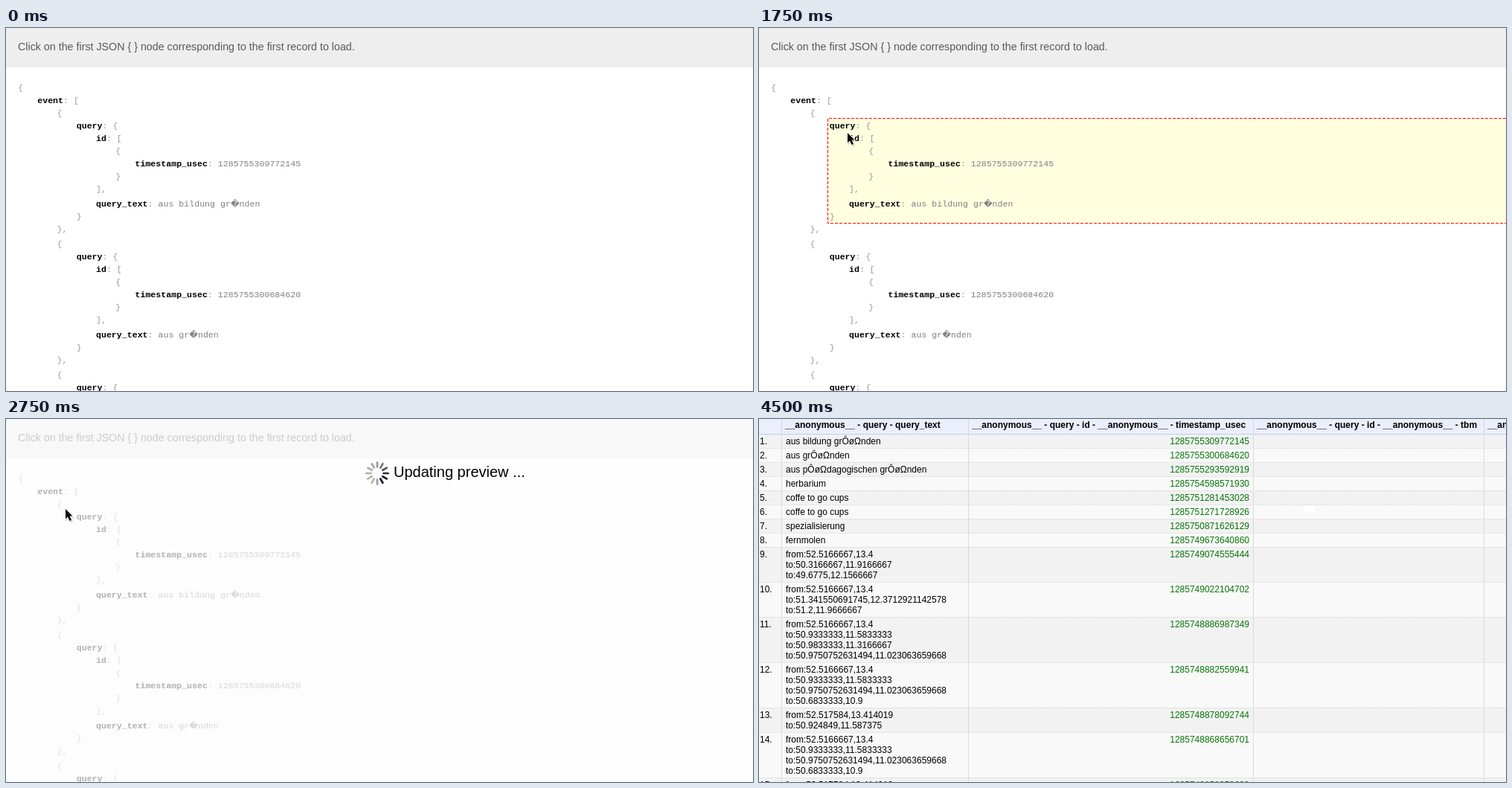
Write an HTML page that moves like this. It is 1004 px wide and 488 px high and loops after 5.25 s.

```html
<!DOCTYPE html>
<html lang="en">
<head>
<meta charset="utf-8">
<title>Choosing a JSON record</title>
<style>
  html, body { margin: 0; width: 100%; height: 100%; overflow: hidden; background: #fff; }
  svg { display: block; width: 1004px; height: 488px; }
  text { font-family: "Liberation Sans", Arial, sans-serif; font-size: 12px; }
  .code { font-family: "Liberation Mono", "Courier New", monospace; font-size: 11.6px; fill: #999; }
  .key { font-weight: bold; fill: #000; }
  .value { fill: #808080; }
  .odd-char { font-family: "DejaVu Sans", sans-serif; font-size: 11.4px; }
  .hint { font-size: 14.27px; fill: #5a5a5a; }
  .busy { font-size: 20px; }
  .head { font-weight: bold; }
  .number { fill: #087508; text-anchor: end; }
</style>
</head>
<body>
<svg id="stage" viewBox="0 0 1004 488"></svg>
<script>
const stage = document.getElementById('stage');
const LOOP = 5250;

function add(parent, tag, attrs = {}, content) {
  const node = document.createElementNS('http://www.w3.org/2000/svg', tag);
  for (const name in attrs) node.setAttribute(name, attrs[name]);
  if (content !== undefined) node.textContent = content;
  parent.append(node);
  return node;
}
const group = parent => add(parent, 'g');
const rect = (parent, x, y, width, height, fill) =>
  add(parent, 'rect', { x, y, width, height, fill });
const label = (parent, x, y, content, cls = '') =>
  add(parent, 'text', { x, y, class: cls }, content);
const show = (node, on) => { node.style.display = on ? '' : 'none'; };

// JSON view
const json = group(stage);
rect(json, 0, 0, 1004, 488, '#fff');
rect(json, 0, 0, 1004, 53, '#eee');
label(json, 16, 30, 'Click on the first JSON { } node corresponding to the first record to load.', 'hint');

function highlight(x, y, bottom, color) {
  const g = group(json);
  rect(g, x, y, 1004 - x, bottom - y, '#ffffe0');
  add(g, 'path', {
    d: `M1004 ${y + .5}H${x + .5}V${bottom - .5}H1004`,
    fill: 'none', stroke: color, 'stroke-dasharray': '4 2'
  });
  return g;
}
const innerBox = highlight(92, 121, 263, '#f00');
const outerBox = highlight(65, 104, 280, '#c41010');

function codeLine(depth, y, key, rest, isValue) {
  const line = label(json, 16 + depth * 26.25, y, '', 'code');
  if (key) {
    add(line, 'tspan', { class: 'key' }, key);
    add(line, 'tspan', {}, ':\u00a0');
  }
  rest.split(/(\ufffd)/).forEach(part => add(line, 'tspan', {
    class: (isValue ? 'value' : '') + (part === '\ufffd' ? ' odd-char' : '')
  }, part));
}

function record(y, stamp, query) {
  codeLine(2, y, '', '{');
  codeLine(3, y + 17, 'query', '{');
  codeLine(4, y + 34, 'id', '[');
  codeLine(5, y + 51, '', '{');
  codeLine(6, y + 68, 'timestamp_usec', stamp, true);
  codeLine(5, y + 85, '', '}');
  codeLine(4, y + 102, '', '],');
  codeLine(4, y + 122, 'query_text', query, true);
  codeLine(3, y + 139, '', '}');
  codeLine(2, y + 156, '', '},');
}
codeLine(0, 84, '', '{');
codeLine(1, 101, 'event', '[');
record(118, '1285755309772145', 'aus bildung gr\ufffdnden');
record(294, '1285755300684620', 'aus gr\ufffdnden');
codeLine(2, 470, '', '{');
codeLine(3, 487, 'query', '{');

// Loading veil
const veil = group(stage);
add(veil, 'rect', { width: 1004, height: 488, fill: '#fcfcfc', opacity: .7 });
const shades = ['#999', '#777', '#555', '#2c2c38', '#11111f', '#15152a',
  '#999', '#b4b4b4', '#b4b4b4', '#b0b0b0', '#acacac', '#a4a4a4'];
shades.forEach((stroke, i) => add(veil, 'line', {
  x1: 0, x2: 0, y1: -8.5, y2: -14.7, stroke, 'stroke-width': 2.7, 'stroke-linecap': 'round',
  transform: `translate(499 73) rotate(${i * 30})`
}));
label(veil, 521, 78, 'Updating preview ...', 'busy');

// Table view
const table = group(stage);
const origin = 'from:52.5166667,13.4';
const west = 'to:50.9333333,11.5833333';
const middle = 'to:50.9750752631494,11.023063659668';
const south = 'to:50.6833333,10.9';
const rows = [
  ['1285755309772145', 'aus bildung grÔøΩnden'],
  ['1285755300684620', 'aus grÔøΩnden'],
  ['1285755293592919', 'aus pÔøΩdagogischen grÔøΩnden'],
  ['1285754598571930', 'herbarium'],
  ['1285751281453028', 'coffe to go cups'],
  ['1285751271728926', 'coffe to go cups'],
  ['1285750871626129', 'spezialisierung'],
  ['1285749673640860', 'fernmolen'],
  ['1285749074555444', origin, 'to:50.3166667,11.9166667', 'to:49.6775,12.1566667'],
  ['1285749022104702', origin, 'to:51.341550691745,12.3712921142578', 'to:51.2,11.9666667'],
  ['1285748886987349', origin, west, 'to:50.9833333,11.3166667', middle],
  ['1285748882559941', origin, west, middle, south],
  ['1285748878092744', 'from:52.517584,13.414019', 'to:50.924849,11.587375'],
  ['1285748868656701', origin, west, middle, south],
  ['1285748858970602', 'from:52.517584,13.414019']
];
rect(table, 0, 0, 1004, 20, '#ebeefb');
let rowY = 20;
rows.forEach(([stamp, ...lines], i) => {
  const height = 5 + lines.length * 14;
  rect(table, 0, rowY, 1004, height, i % 2 ? '#f9f9f9' : '#f2f2f3');
  if (i) add(table, 'path', { d: `M0 ${rowY + .5}H1004`, stroke: '#d4d4d4', 'stroke-dasharray': '1 1' });
  label(table, 1, rowY + 14, `${i + 1}.`);
  lines.forEach((line, n) => label(table, 36, rowY + 14 + n * 14, line));
  label(table, 659, rowY + 14, stamp, 'number');
  rowY += height;
});
rect(table, 0, 20, 1004, 1, '#bccff0');
[30, 281, 664, 974].forEach(x => rect(table, x, 0, 1, 488, '#d9d9d9'));
const anon = '__anonymous__';
[
  [35, `${anon} - query - query_text`],
  [286, `${anon} - query - id - ${anon} - timestamp_usec`],
  [669, `${anon} - query - id - ${anon} - tbm`],
  [979, `${anon} - query`]
].forEach(([x, title]) => label(table, x, 12, title, 'head'));
const patch = rect(table, 732, 117, 15, 8, '#fff');

// Pointer
const pointer = group(stage);
const arrow = 'M0 0V13.2L3 10.4L5.6 16L8 15L5.5 9.6H9.4Z';
add(pointer, 'path', {
  d: arrow, transform: 'translate(1 1.5)', opacity: .18, stroke: '#000', 'stroke-width': 1.5
});
add(pointer, 'path', { d: arrow, stroke: '#fff', 'stroke-width': 1.6, 'paint-order': 'stroke' });

// [start time, x, y] of the pointer tip
const moves = [
  [250, 219, 73], [500, 156, 146], [750, 116, 133], [1000, 96, 122],
  [1250, 78, 121], [1500, 115, 141], [1750, 119, 141], [2000, 90, 133],
  [2250, 82, 123], [2500, 80, 121], [3250, 83, 124], [3750, 86, 123],
  [4000, 124, 132], [4250, 734, 106]
];

function draw(t) {
  const within = (from, to) => t >= from && t < to;
  show(json, t < 3000);
  show(innerBox, within(1750, 2250));
  show(outerBox, within(2250, 2750));
  show(veil, within(2750, 3000));
  show(table, t >= 3000);
  show(patch, t >= 4500);
  show(pointer, within(250, 4500));
  const move = moves.filter(m => m[0] <= t).pop();
  if (move) pointer.setAttribute('transform', `translate(${move[1]} ${move[2]})`);
}

const begin = performance.now();
function tick() {
  draw((performance.now() - begin) % LOOP);
  requestAnimationFrame(tick);
}
draw(0);
requestAnimationFrame(tick);
</script>
</body>
</html>
```
